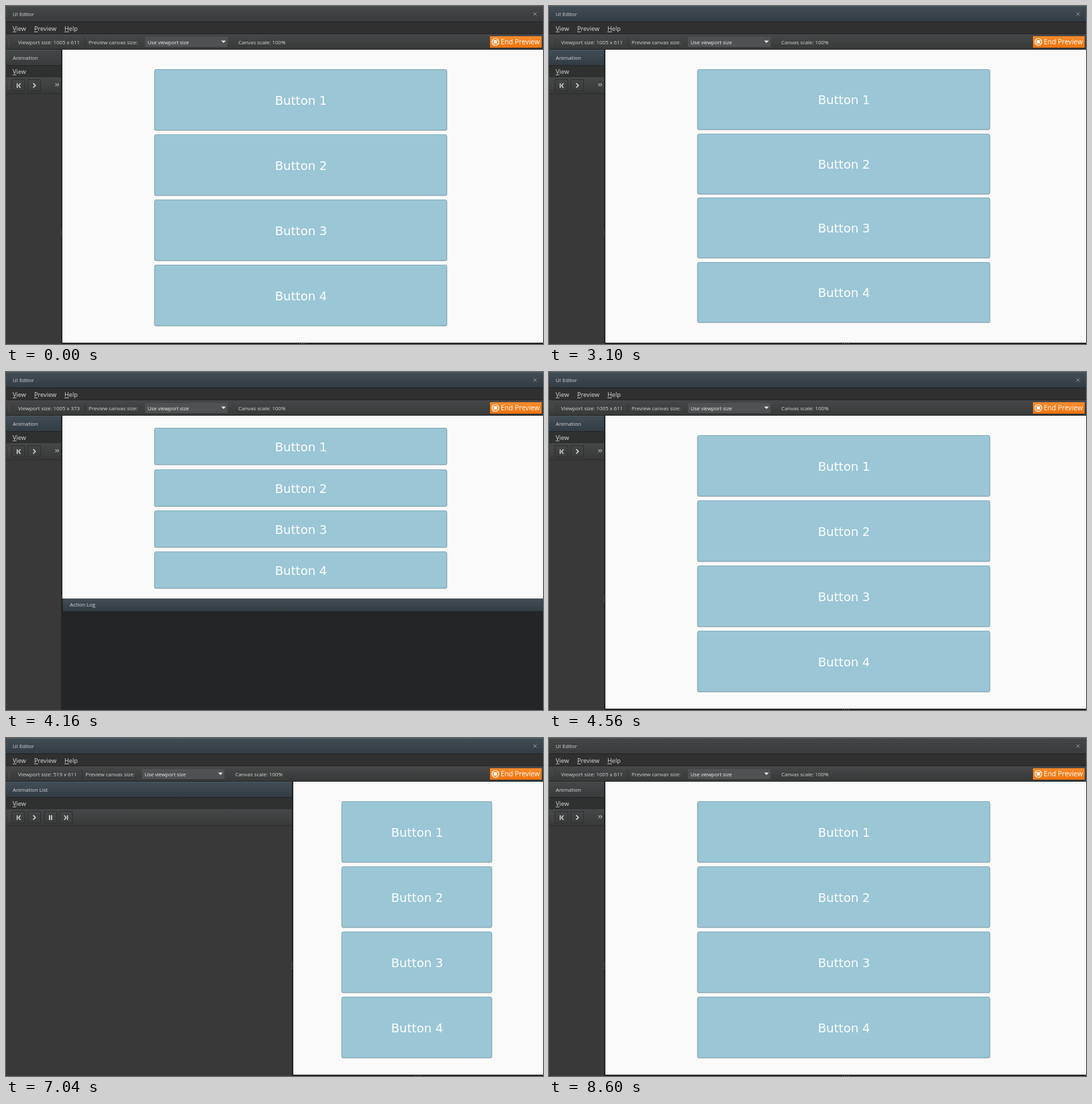
Write an HTML page with a canvas that moves like this. It is 800 px wide and 503 px high and loops after 8.64 s.

```html
<!DOCTYPE html>
<html lang="en">
<head>
<meta charset="utf-8">
<title>UI Editor preview</title>
<style>
html, body { margin: 0; width: 100%; height: 100%; overflow: hidden; background: #38393a; }
canvas { display: block; width: 800px; height: 503px; }
</style>
</head>
<body>
<canvas id="stage" width="800" height="503"></canvas>
<script>
const ctx = document.getElementById('stage').getContext('2d');
const LOOP = 8640, STEP = 20, SCALE = 0.7114;
const LEFT = 84.45, WIDE = 446, TOP = 66, BOTTOM = 501, RAISED = 280;
const UI = '"Open Sans", "Noto Sans", sans-serif';

const smooth = u => u * u * (3 - 2 * u);
const lerp = (a, b, u) => a + (b - a) * u;

// Left edge of the preview, set by the vertical splitter.
function splitX(t) {
  if (t < 5760 || t >= 7800) return LEFT;
  if (t < 6800) return lerp(LEFT, WIDE, Math.pow(smooth((t - 5740) / 1060), 1.245));
  if (t < 6940) return WIDE;
  return lerp(WIDE, LEFT, smooth((t - 6920) / 880));
}

// Lower edge of the preview, set by the log panel.
function splitY(t) {
  if (t < 3100 || t >= 4560) return BOTTOM;
  if (t <= 3960) {
    const u = (t - 3080) / 880;
    return lerp(BOTTOM, RAISED, u + u * u - u * u * u);
  }
  return lerp(RAISED, BOTTOM, smooth((t - 3960) / 600));
}

function rect(x, y, w, h, color) {
  ctx.fillStyle = color;
  ctx.fillRect(x, y, w, h);
}

function bar(x, y, w, h, from, to) {
  const g = ctx.createLinearGradient(0, y, 0, y + h);
  g.addColorStop(0, from);
  g.addColorStop(1, to);
  rect(x, y, w, h, g);
}

function text(str, x, y, size = 7.85, color = '#d6d6d6', family = UI) {
  ctx.font = size + 'px ' + family;
  ctx.fillStyle = color;
  ctx.fillText(str, x, y);
}

function menu(str, x, y) {
  text(str, x, y, 9.2, '#dcdcdc');
  rect(x, y + 1, ctx.measureText(str[0]).width, 1, '#b4b4b4');
}

function line(points, color, width = 1) {
  ctx.beginPath();
  points.forEach(([x, y]) => ctx.lineTo(x, y));
  ctx.strokeStyle = color;
  ctx.lineWidth = width;
  ctx.stroke();
}

function fillPath(points, color) {
  ctx.beginPath();
  points.forEach(([x, y]) => ctx.lineTo(x, y));
  ctx.fillStyle = color;
  ctx.fill();
}

function dots(x, y, dx, dy, n, color) {
  for (let i = 0; i < n; i++) rect(x + i * dx, y + i * dy, 1, 1, color);
}

function roundBox(x, y, w, h, r, color) {
  ctx.beginPath();
  ctx.roundRect(x, y, w, h, r);
  ctx.fillStyle = color;
  ctx.fill();
}

function header(x, y, w, h, focused) {
  if (focused) bar(x, y, w, h, '#424d55', '#323c43');
  else bar(x, y, w, h, '#444748', '#393b3c');
  rect(x, y, w, 1, focused ? '#4f5b63' : '#505354');
}

function topBars(focused, viewW, viewH) {
  header(0, 0, 800, 23, focused);
  text('UI Editor', 10, 15);
  line([[785.5, 9.5], [790.5, 14.5]], '#8f9395');
  line([[790.5, 9.5], [785.5, 14.5]], '#8f9395');

  rect(0, 23, 800, 18, '#303030');
  rect(0, 23, 800, 1, '#222324');
  menu('View', 10, 37);
  menu('Preview', 42, 37);
  menu('Help', 87, 37);

  bar(0, 42, 800, 22, '#474849', '#373838');
  rect(0, 41, 800, 1, '#232424');
  rect(0, 64, 800, 1, '#222324');
  dots(4, 49, 0, 3, 4, '#6c6d6e');
  text(`Viewport size: ${viewW} x ${viewH}`, 18, 57);

  const dx = viewW < 1000 ? -4.5 : 0;
  rect(Math.round(117 + dx), 47, 1, 13, '#2f3030');
  text('Preview canvas size:', 123 + dx, 57);
  roundBox(207 + dx, 46, 123, 15, 1, '#505152');
  text('Use viewport size', 211 + dx, 57, 7.6, '#f0f0f0');
  fillPath([[320.5 + dx, 51.5], [327.5 + dx, 51.5], [324 + dx, 55]], '#f0f0f0');
  text('Canvas scale: 100%', 346 + dx, 57);

  bar(721, 45, 77, 17, '#f98a2a', '#f0750f');
  ctx.beginPath();
  ctx.arc(729, 53.5, 5, 0, 7);
  ctx.strokeStyle = '#fff';
  ctx.lineWidth = 1.2;
  ctx.stroke();
  rect(726.5, 51, 5, 5, '#fff');
  text('End Preview', 737, 57, 10.3, '#fff');
}

function toolBox(cx) {
  ctx.strokeStyle = '#2e2f30';
  ctx.lineWidth = 1;
  ctx.strokeRect(cx - 9.5, 109.5, 19, 17);
}

function sidePanel(x, focused) {
  const w = x - 2;
  ctx.save();
  ctx.beginPath();
  ctx.rect(0, TOP - 1, w, 504 - TOP);
  ctx.clip();
  rect(0, TOP, w, 437, '#39393a');
  header(0, TOP - 1, w, 23, focused);
  text(w > 92 ? 'Animation List' : 'Animation', 10, 80);
  rect(0, 88, w, 18, '#2f3030');
  rect(0, 88, w, 1, '#242526');
  menu('View', 10, 101);
  bar(0, 106, w, 24, '#464748', '#383939');
  rect(0, 130, w, 1, '#2a2b2b');
  dots(4, 113, 0, 3, 4, '#6c6d6e');

  const ink = '#e4e4e4';
  toolBox(18.5);
  rect(16, 115, 1.3, 7, ink);
  line([[21.5, 115.3], [18.7, 118.5], [21.5, 121.7]], ink, 1.3);
  toolBox(42);
  line([[40.5, 115], [43.8, 118.3], [40.5, 121.6]], ink, 1.4);
  if (w > 90) {
    toolBox(66.5);
    rect(64, 115, 1.6, 7, ink);
    rect(67, 115, 1.6, 7, ink);
  }
  if (w > 100) {
    toolBox(89.5);
    line([[86.8, 115.3], [89.6, 118.5], [86.8, 121.7]], ink, 1.3);
    rect(91, 115, 1.3, 7, ink);
  } else {
    for (const px of [w - 8, w - 5]) {
      line([[px - 0.5, 115], [px + 1.7, 117.2], [px - 0.5, 119.4]], ink);
    }
  }
  ctx.restore();
  rect(w, TOP - 1, 2, 438, '#232425');
  dots(x - 2, 333, 0, 3, 4, '#77797a');
}

function buttons(x, viewH) {
  const W = 800 - x;
  const bx = Math.round(x + 0.189 * W + 1.7), bw = Math.round(0.615 * W - 4.3);
  const pitch = 0.2195 * viewH + 1.5, bh = Math.round(pitch - 6);
  for (let i = 0; i < 4; i++) {
    const by = Math.round(TOP + 0.0644 * viewH + i * pitch);
    roundBox(bx - 0.5, by + 0.7, bw + 1, bh + 0.3, 3.5, 'rgba(90,105,115,0.35)');
    roundBox(bx, by, bw, bh, 3, '#7fa5b4');
    roundBox(bx + 0.8, by + 0.8, bw - 1.6, bh - 1.6, 2.5, '#9ac6d6');
    ctx.textAlign = 'center';
    text('Button ' + (i + 1), bx + bw / 2 + 0.5, Math.floor(by + bh / 2 + 7.5), 18, '#fff',
      '"DejaVu Sans", sans-serif');
    ctx.textAlign = 'left';
  }
}

function logPanel(x, y) {
  rect(x - 2, y, 802 - x, 503 - y, '#232526');
  if (y < BOTTOM) {
    header(x + 1, y, 799 - x, 19, true);
    text('Action Log', x + 11, y + 12);
  } else {
    dots(Math.round((x + 800) / 2) - 5, 502, 3, 0, 4, '#77797a');
  }
}

function draw(ms) {
  const t = Math.floor((ms % LOOP) / STEP) * STEP;
  const focused = t >= 1180 && t < 8600;
  const x = Math.round(splitX(t)), y = splitY(t);

  // The size readout trails the splitter slightly, except while the side panel widens.
  const seen = t > 5700 && t <= 6800 ? t : t - 11;
  const viewW = Math.floor((800 - splitX(seen)) / SCALE);
  const viewH = Math.floor((splitY(seen) - TOP) / SCALE);

  rect(0, 0, 800, 503, '#38393a');
  topBars(focused, viewW, viewH);
  sidePanel(x, focused);
  rect(x, TOP - 1, 800 - x, BOTTOM - TOP + 1, '#fafafa');
  buttons(x, y - TOP);
  logPanel(x, y > 490 ? BOTTOM : Math.round(y));
}

const start = performance.now();
function tick() {
  draw(performance.now() - start);
  requestAnimationFrame(tick);
}
tick();
</script>
</body>
</html>
```
